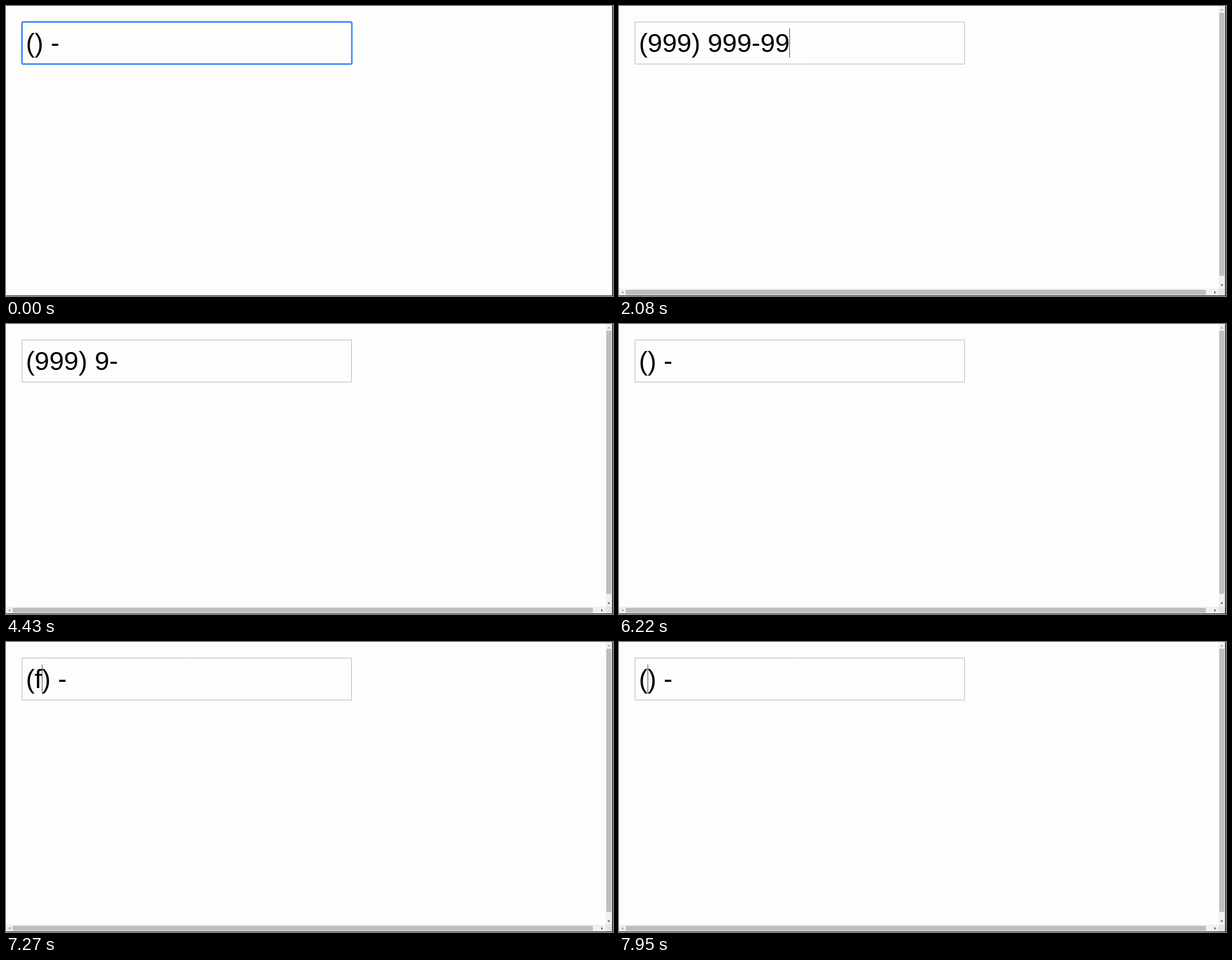
These frames come from a looping animation (1083x517 px, 8000 ms). An HTML page with a canvas:

```html
<!DOCTYPE html>
<html lang="en">
<head>
<meta charset="utf-8">
<title>Masked phone input</title>
<style>
  html, body { margin: 0; width: 100%; height: 100%; overflow: hidden; background: #fdfdfc; }
  canvas { display: block; }
</style>
</head>
<body>
<canvas id="stage" width="1083" height="517"></canvas>
<script>
const ctx = document.getElementById('stage').getContext('2d');
const LOOP = 8000, FONT = 47, TEXT_X = 35.4, BASELINE = 82;

// Each state: start time, typed characters, caret visible.
const nines = n => '9'.repeat(n);
const states = [
  [0, '', 0], [350, '', 1],
  [470, nines(1), 1], [670, nines(2), 1], [750, nines(3), 1],
  [1130, nines(4), 1], [1320, nines(5), 1], [1480, nines(6), 1],
  [1920, nines(7), 1], [2080, nines(8), 1], [2280, nines(9), 1], [2450, nines(10), 1],
  [2980, nines(10), 0], [3050, nines(9), 0], [3300, nines(8), 0],
  [3500, nines(8), 1], [3550, nines(7), 1], [3820, nines(6), 1],
  [4080, nines(5), 0], [4320, nines(4), 0], [4580, nines(4), 1],
  [4670, nines(3), 1], [4830, nines(2), 1], [5080, nines(1), 1],
  [5200, nines(1), 0], [5580, '', 0], [5680, '', 1], [6220, '', 0]
];

// Letters flash up and are rejected by the mask straight away.
function mash(start, step, words) {
  words.forEach((word, i) => {
    states.push([start + 2 * i * step, word, 1], [start + (2 * i + 1) * step, '', 1]);
  });
}
mash(6300, 64, ['s', 'f', 'asf', 'd', 'j', 'sd']);
mash(7080, 47.5, ['d', 'sd', 'f', 'jasd', 'a', 's', 'f', 'kd', 'j']);
states.push([7920, 'f', 1], [7950, '', 1]);

function mask(typed) {
  if (!/^9*$/.test(typed)) return { text: `(${typed}) -`, caret: typed.length + 1 };
  const n = typed.length;
  return {
    text: `(${typed.slice(0, 3)}) ${typed.slice(3, 6)}-${typed.slice(6)}`,
    caret: n + 1 + (n >= 3 ? 2 : 0) + (n >= 6 ? 1 : 0)
  };
}

function rect(color, x, y, w, h) {
  ctx.fillStyle = color;
  ctx.fillRect(x, y, w, h);
}

function arrow(color, x, y, dx, dy) {
  ctx.fillStyle = color;
  ctx.beginPath();
  ctx.moveTo(x + dx * 1.5, y + dy * 1.5);
  ctx.lineTo(x - dx * 1.5 + dy * 2.5, y - dy * 1.5 + dx * 2.5);
  ctx.lineTo(x - dx * 1.5 - dy * 2.5, y - dy * 1.5 - dx * 2.5);
  ctx.fill();
}

function drawScrollbars() {
  rect('#f0f0f0', 1070, 0, 12, 517);
  rect('#f0f0f0', 0, 504, 1082, 12);
  rect('#e4e4e4', 1070, 504, 12, 12);
  rect('#bebebe', 1071, 12, 9, 469);
  rect('#bebebe', 12, 506, 1035, 9);
  arrow('#a0a0a0', 1075.5, 6.5, 0, -1);
  arrow('#505050', 1075.5, 498, 0, 1);
  arrow('#909090', 6, 510.5, -1, 0);
  arrow('#505050', 1063.5, 510.5, 1, 0);
}

function drawField(focused) {
  ctx.strokeStyle = focused ? '#488ff5' : '#b4b4c0';
  ctx.lineWidth = focused ? 3 : 1;
  ctx.beginPath();
  if (focused) ctx.roundRect(28.5, 28.5, 588.5, 75, 2.5);
  else ctx.rect(28.5, 28.5, 588, 75);
  ctx.stroke();
}

function draw(t) {
  const [, typed, caretOn] = states.findLast(s => s[0] <= t);
  const { text, caret } = mask(typed);
  rect('#fdfdfc', 0, 0, 1083, 517);
  if (t >= 350) drawScrollbars();
  rect('#181818', 1081.5, 0, 1.5, 517);
  rect('#181818', 0, 516, 1083, 1);
  drawField(t < 80);
  ctx.font = `${FONT}px "Liberation Sans", Arial, sans-serif`;
  ctx.fillStyle = '#000';
  ctx.fillText(text, TEXT_X, BASELINE);
  if (caretOn) {
    const x = Math.floor(TEXT_X + ctx.measureText(text.slice(0, caret)).width);
    rect('#404040', x, 40, 1, 52);
  }
}

function tick() {
  draw(performance.now() % LOOP);
  requestAnimationFrame(tick);
}
tick();
</script>
</body>
</html>
```
